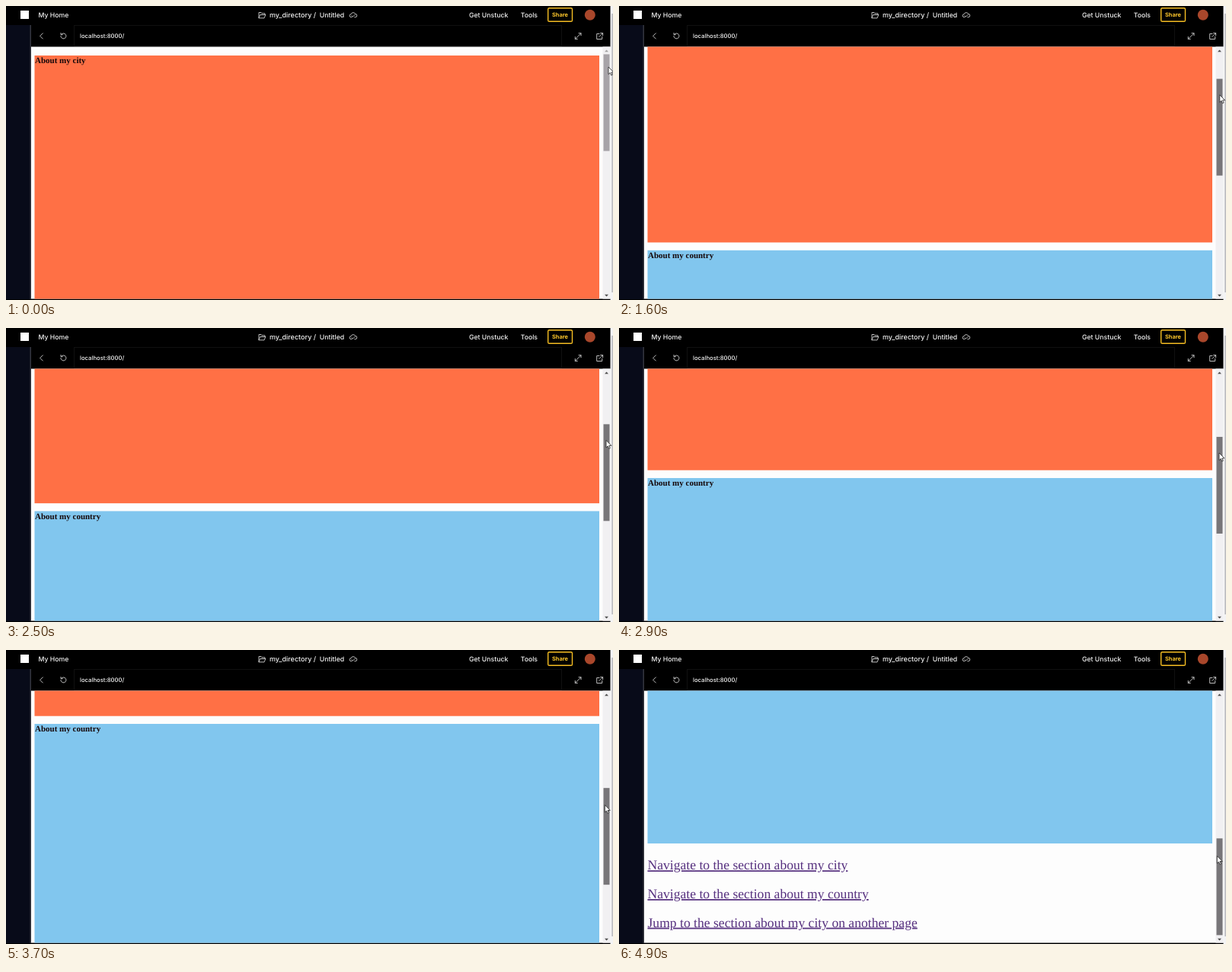
Animation, 797 px wide and 386 px high, one loop 5000 ms. Source, as an HTML page:

```html
<!DOCTYPE html>
<html lang="en">
<head>
<meta charset="utf-8">
<title>Scrolling page preview</title>
<style>
  html, body { margin: 0; width: 100%; height: 100%; overflow: hidden; background: #000; }
  svg { display: block; width: 797px; height: 386px; }
  text { text-rendering: geometricPrecision; }
  .ui { font: 500 8.7px Inter, sans-serif; fill: #f4f4f4; }
  .head { font: bold 11px "Liberation Serif", serif; fill: #16080a; }
  .link { font: 17.6px "Liberation Serif", serif; fill: #56307f; text-decoration: underline; }
  .icon { fill: none; stroke: #d2d2d2; stroke-width: .9; stroke-linecap: round; stroke-linejoin: round; }
</style>
</head>
<body>
<svg viewBox="0 0 797 386">
  <defs><clipPath id="view"><rect x="33" y="53.5" width="750" height="331"/></clipPath></defs>

  <rect width="797" height="386" fill="#000"/>
  <rect y="25" width="32" height="360" fill="#080b19"/>
  <rect x="31.5" y="25" width="1.5" height="360" fill="#34363f"/>

  <!-- page -->
  <rect x="33" y="53.5" width="761" height="331" fill="#fdfdfd"/>
  <g clip-path="url(#view)">
    <g id="page">
      <rect x="37.5" y="65" width="741.5" height="329.7" fill="#ff7045"/>
      <text class="head" x="38" y="75">About my city</text>
      <rect x="37.5" y="405" width="741.5" height="330" fill="#81c6ee"/>
      <text class="head" x="38" y="415.3">About my country</text>
      <text class="link" x="37.5" y="769.3">Navigate to the section about my city</text>
      <text class="link" x="37.5" y="807">Navigate to the section about my country</text>
      <text class="link" x="37.5" y="844.6">Jump to the section about my city on another page</text>
    </g>
  </g>

  <!-- scrollbars -->
  <rect x="783.5" y="53.5" width="10" height="331" fill="#f1f0f2"/>
  <path id="up" d="M786 60.3l2.5-2.8 2.5 2.8z"/>
  <path d="M786 378.7l2.5 2.8 2.5-2.8z" fill="#505050"/>
  <rect id="thumb" x="784.5" y="63.4" width="8" height="127"/>
  <rect x="793.5" width="3.5" height="386" fill="#f3f3f4"/>
  <rect x="795.3" y="10" width="1.7" height="366" fill="#bcbcc0"/>

  <!-- top bar -->
  <rect x="19" y="6" width="11" height="11" fill="#fff"/>
  <g class="ui">
    <text x="42.5" y="14.7">My Home</text>
    <text x="346" y="14.7" style="font-size:9px">my_directory /</text>
    <text x="411.8" y="14.7">Untitled</text>
    <text x="608" y="14.7">Get Unstuck</text>
    <text x="675.7" y="14.7">Tools</text>
    <text x="97" y="41.8" style="font-size:7.7px">localhost:8000/</text>
    <text x="717" y="13.7" style="font-size:7.4px;font-weight:700;fill:#ffc82b">Share</text>
  </g>
  <rect x="711.7" y="2.7" width="31.8" height="17.6" rx="1.6" fill="none" stroke="#f5bd22" stroke-width="1.4"/>
  <circle cx="766.8" cy="11.7" r="7" fill="#a9472b"/>
  <rect x="89.5" y="25.5" width="640" height="27" fill="none" stroke="#101010"/>
  <g class="icon">
    <path d="M332 15.5v-7h3l1 1.3h4v1.7M332 15.5l1.8-4h7l-1.6 4z"/>
    <path d="M454 14.7h-.8a2 2 0 0 1 0-4 2.8 2.8 0 0 1 5.3-.3 2.1 2.1 0 0 1 .2 4.3h-1M453.8 12.8l1.5 1.4 2.8-2.8"/>
    <path d="M48.3 35.8l-3.6 3.6 3.6 3.6"/>
    <path d="M72.6 37.3a3.5 3.5 0 1 1-.7 2.2M72 35.5v2.2h2.2"/>
    <path d="M747.5 43.2l7.3-7.3M752 35.7h3v3M747.3 40.4v3h3"/>
    <path d="M779 36.5h-3.3v7h7v-3.3M778.8 40.4l4.6-4.6M780.6 35.6h3v3"/>
  </g>

  <path id="cursor" d="M0 0v9.6l2.2-2 1.5 3.4 1.6-.7-1.5-3.3h3.1z" fill="#fff" stroke="#222" stroke-width=".8"/>
</svg>
<script>
const LOOP = 5000, STEP = 100, PRESS = 600;
const byId = id => document.getElementById(id);
const page = byId('page'), thumb = byId('thumb'), up = byId('up'), cursor = byId('cursor');

// time, scroll offset, pointer x, pointer y
const steps = [
  [0, 0, 791, 80],
  [600, 0, 790.5, 84.5],
  [1000, 36.5, 789.5, 98.5],
  [2200, 132, 788, 135],
  [2900, 208, 788, 164],
  [3700, 308, 786.3, 203.5],
  [4400, 400, 786.3, 235],
  [4900, 481, 785.3, 270.5]
];

function stateAt(t) {
  const next = steps.findIndex(s => s[0] > t);
  if (next < 0) return steps[steps.length - 1];
  const a = steps[next - 1], b = steps[next];
  const k = (t - a[0]) / (b[0] - a[0]);
  return a.map((v, i) => v + (b[i] - v) * k);
}

function draw(time) {
  const t = Math.floor(time % LOOP / STEP) * STEP;
  const [, scroll, x, y] = stateAt(t);
  page.setAttribute('transform', `translate(0 ${-scroll})`);
  thumb.setAttribute('y', 63.4 + scroll / 2.615);
  thumb.setAttribute('fill', t < PRESS ? '#a7a3a8' : '#787679');
  up.setAttribute('fill', scroll ? '#505050' : '#a3a3a3');
  cursor.setAttribute('transform', `translate(${x} ${y})`);
}

const start = performance.now();
function tick() {
  draw(performance.now() - start);
  requestAnimationFrame(tick);
}
tick();
</script>
</body>
</html>
```
